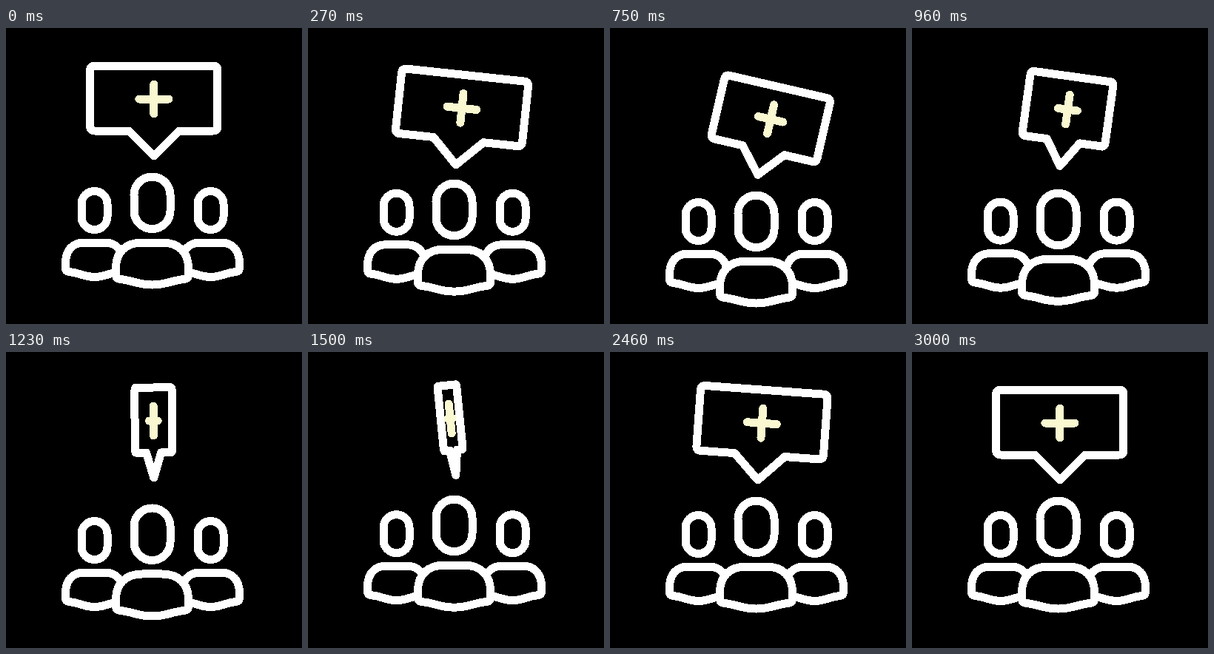
An HTML page that plays this animation: 400 by 400 pixels, repeating every 3090 ms.

```html
<!DOCTYPE html>
<html lang="en">
<head>
<meta charset="utf-8">
<title>Group with health speech bubble</title>
<style>
  html, body { margin: 0; height: 100%; background: #000; overflow: hidden; }
  svg { display: block; width: 100vw; height: 100vh; shape-rendering: crispEdges; }
  svg * { vector-effect: non-scaling-stroke; }
</style>
</head>
<body>
<svg viewBox="0 0 400 400" fill="#000" stroke="#fff" stroke-width="11" stroke-linecap="round" stroke-linejoin="round">
  <defs>
    <g id="person">
      <rect x="-17.5" y="220.5" width="35" height="52" rx="17.5"/>
      <path d="M-39 318C-39 301 -30 290 -14 290H14C30 290 39 301 39 318V324Q39 329 34 329.5C18 331 15 336.5 0 336.5C-15 336.5 -18 331 -34 329.5Q-39 329 -39 324Z"/>
    </g>
  </defs>
  <g id="sides">
    <use href="#person" x="119.5"/>
    <use href="#person" x="276.5"/>
  </g>
  <g id="leader">
    <rect x="173" y="201" width="49" height="70.5" rx="24.5"/>
    <path d="M148.5 324C148.5 303 162 290 184 290H211C233 290 246.5 303 246.5 324V334Q246.5 339 241 339.5C223 341 218 347 197.5 347C177 347 172 341 154 339.5Q148.5 339 148.5 334Z"/>
  </g>
  <g id="bubble">
    <path d="M-80 -122H80Q86 -122 86 -116V-40Q86 -34 80 -34H34L0 0L-34 -34H-80Q-86 -34 -86 -40V-116Q-86 -122 -80 -122Z"/>
    <path d="M-20 -77H20M0 -97V-57" stroke="#faf8d0"/>
  </g>
</svg>
<script>
  const LOOP = 3090, STEP = 30, LAST = 3000;

  const clamp = u => Math.min(1, Math.max(0, u));
  const smooth = u => u * u * (3 - 2 * u);
  const ease = (t, from, to) => smooth(clamp((t - from) / (to - from)));

  // People sink by `low`, rebound to `high`, then settle.
  const bob = (t, low, high) =>
    low * ease(t, 0, 660) + (high - low) * ease(t, 800, 1640) - high * ease(t, 1800, 2300);

  // The bubble drops, lifts and settles on its tip while it rocks and turns over.
  const drop = t => 28 * ease(t, 0, 600) - 34.5 * ease(t, 620, 1380) + 6.5 * ease(t, 1650, 2150);
  const tilt = t => 14.3 * ease(t, 0, 600) - 20.2 * ease(t, 600, 1560)
    + 10.1 * ease(t, 1640, 2400) - 4.2 * ease(t, 2430, 3000);
  const flip = t => 1 - 2 * smooth(clamp((t - 250) / 1980) ** 1.3);

  const place = (id, transform) => document.getElementById(id).setAttribute("transform", transform);
  const start = performance.now();

  function draw() {
    const elapsed = Math.max(0, performance.now() - start) % LOOP;
    const t = Math.min(LAST, Math.floor(elapsed / STEP) * STEP);
    place("sides", `translate(0 ${bob(t - 90, 15, -4.4)})`);
    place("leader", `translate(0 ${bob(t, 25, -4)})`);
    place("bubble", `translate(199.8 ${173 + drop(t)}) rotate(${tilt(t)}) scale(${flip(t)} 1)`);
    requestAnimationFrame(draw);
  }
  draw();
</script>
</body>
</html>
```
